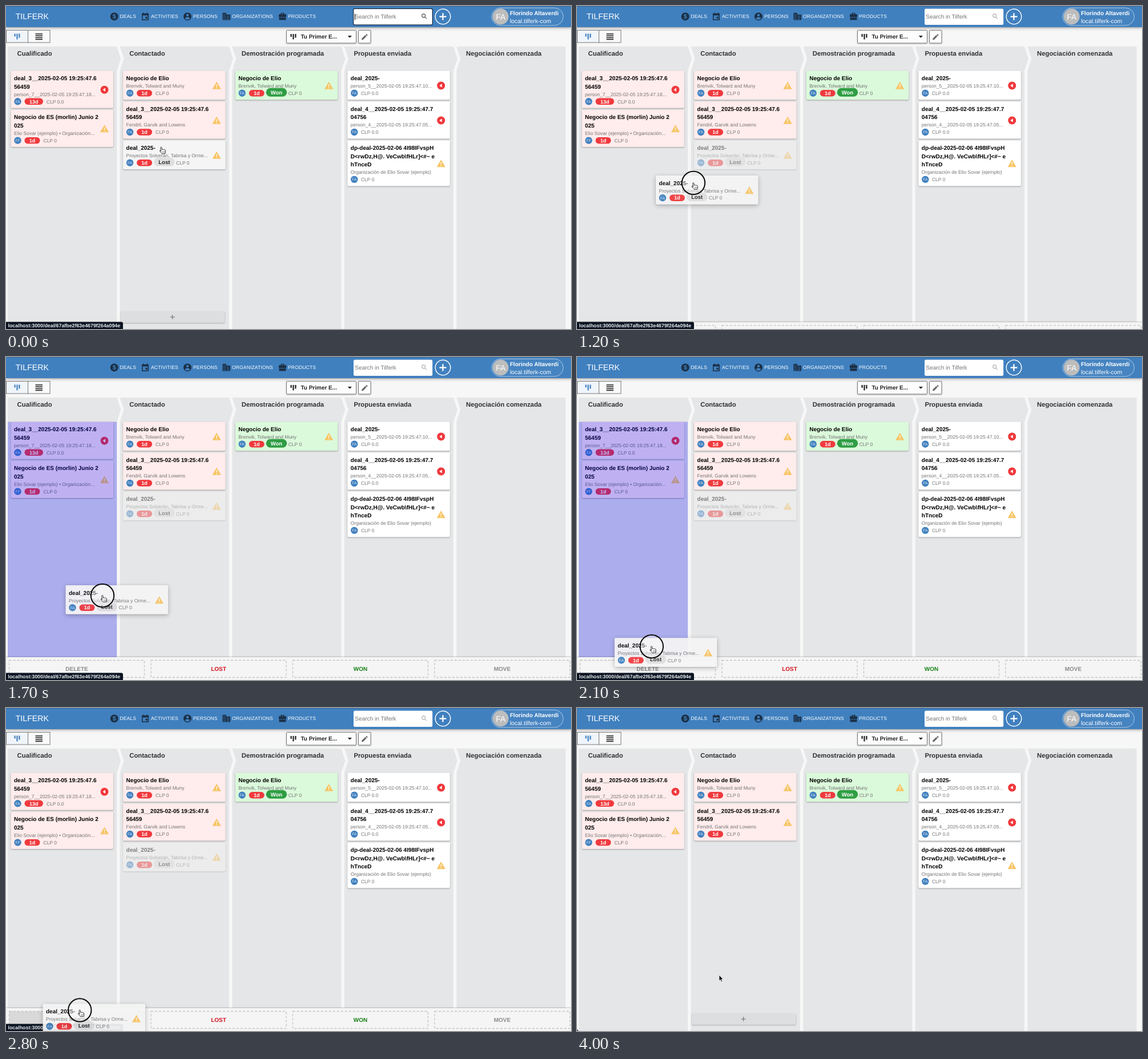
Recreate the animation shown at these times as an HTML page. Size 990 by 566 pixels, loop 4.6 s.

```html
<!DOCTYPE html>
<html lang="es">
<head>
<meta charset="utf-8">
<title>Deals board</title>
<style>
html, body { margin: 0; width: 100%; height: 100%; overflow: hidden; background: #f7f7f7; }
svg { display: block; width: 100vw; height: 100vh; font-family: "Liberation Sans", Arial, sans-serif; text-rendering: geometricPrecision; }
.b { font-weight: bold; }
.m { text-anchor: middle; }
.nav text { font-size: 8.5px; letter-spacing: .16px; fill: #fff; }
.head { font-size: 11.35px; font-weight: bold; fill: #303133; }
.title { font-size: 10px; font-weight: bold; fill: #000; }
.sub { font-size: 8.5px; fill: #737373; }
.tag { font-weight: bold; text-anchor: middle; }
.face { filter: drop-shadow(0 1px 1px rgba(0,0,0,.32)); }
.lift .face { filter: drop-shadow(0 1px 1px rgba(0,0,0,.12)) drop-shadow(0 2px 4px rgba(0,0,0,.25)); }
.soft { filter: drop-shadow(0 1px 1px rgba(0,0,0,.25)); }
.top { filter: drop-shadow(0 1px 1px rgba(0,0,0,.2)) drop-shadow(0 2px 2.5px rgba(0,0,0,.22)); }
</style>
</head>
<body>
<svg id="stage" viewBox="0 0 990 566" preserveAspectRatio="none">
  <rect width="990" height="566" fill="#f7f7f7"/>
  <g id="columns"></g>
  <g id="add">
    <rect class="soft" x="201" y="535" width="182.5" height="20" rx="2" fill="#dddee0"/>
    <path d="M287.7 545h8M291.7 541v8" stroke="#666" fill="none"/>
  </g>
  <g id="cards"></g>
  <rect id="over" x="3" y="113.5" width="191.2" height="452.5" fill="rgba(0,0,255,.25)"/>

  <rect class="top" width="990" height="37" fill="#4080bf"/>
  <rect width="990" height="1" fill="#35699c"/>
  <text x="16.7" y="23" font-size="14.2" fill="#fff">TILFERK</text>
  <g class="nav" fill="#1b2f45">
    <circle cx="189.7" cy="18.4" r="7"/>
    <text class="b m" x="189.7" y="22.2" style="font-size:11px;fill:#4080bf;letter-spacing:0">$</text>
    <path fill-rule="evenodd" d="M238 13h2v-1.6h1.5V13h5v-1.6h1.5V13h2v12h-12zM239.5 16.5v7h9v-7zM244.5 18.8h3.2v3.2h-3.2z"/>
    <circle cx="318" cy="18.4" r="7"/>
    <g fill="#4080bf"><circle cx="318" cy="16" r="2.2"/><path d="M313.7 22q0-2.6 4.3-2.6t4.3 2.6q-1.7 2-4.3 2t-4.3-2z"/></g>
    <path d="M379.5 12h6.5v12.5h-6.5zM386 15h7v9.5h-7z"/>
    <path d="M381 14.5h4M381 17.3h4M381 20h4M381 22.7h4M387 17.6h4.7M387 20.3h4.7M387 22.9h4.7" stroke="#4080bf" stroke-width="1.2" stroke-dasharray="1.4 1"/>
    <path fill-rule="evenodd" d="M478 14.5h3.5V12h6v2.5h3.5v5h-13zM483 13.3v1.2h3v-1.2zM478.5 20.3h12v4.2h-12z"/>
    <text x="199.4" y="21.4">DEALS</text>
    <text x="254" y="21.4">ACTIVITIES</text>
    <text x="328" y="21.4">PERSONS</text>
    <text x="396" y="21.4">ORGANIZATIONS</text>
    <text x="494" y="21.4">PRODUCTS</text>
  </g>
  <rect x="609" y="4.7" width="138.2" height="28.3" rx="2.5" fill="#fff"/>
  <g id="focus">
    <rect x="608.6" y="4.6" width="138.8" height="28.6" rx="2.5" fill="none" stroke="#10233a" stroke-width="1.2"/>
    <path d="M611.3 13.5v11" stroke="#111"/>
  </g>
  <text x="611.3" y="22.4" font-size="10.1" fill="#757575">Search in Tilferk</text>
  <g id="lens" fill="none" stroke-width="1.3"><circle cx="731.7" cy="17" r="3"/><path d="M733.9 19.2l3.2 3.2"/></g>
  <g fill="none" stroke="#fff"><circle cx="765.5" cy="18.6" r="13.3" stroke-width="1.4"/><path d="M759.5 18.6h12M765.5 12.6v12" stroke-width="2.3"/></g>
  <rect x="851" y="3.3" width="125.5" height="30.8" rx="15.4" fill="#4684c1" stroke="#c9dbec" stroke-width=".8"/>
  <circle cx="866.7" cy="18.6" r="14" fill="#bdbdbd"/>
  <text class="m" x="866.7" y="23.5" font-size="14" fill="#fff">FA</text>
  <text class="b" x="883" y="15.8" font-size="10" fill="#fff">Florindo Altaverdi</text>
  <text x="883" y="29.6" font-size="10.4" fill="#fff">local.tilferk-com</text>

  <g stroke="#767676">
    <rect x=".5" y="42.5" width="38" height="21.5" fill="#f0f5fb"/>
    <rect x="38.5" y="42.5" width="38.5" height="21.5" fill="#fafafa"/>
    <rect class="soft" x="491.5" y="42.5" width="122" height="22.5" rx="1" fill="#fdfdfd"/>
    <rect class="soft" x="617.5" y="42.5" width="21.5" height="22.5" rx="1" fill="#fdfdfd"/>
  </g>
  <path d="M14.5 48.5h2.2v5h-2.2zM18.4 48.5h2.2v10h-2.2zM22.3 48.5h2.2v7h-2.2z" fill="#4080bf"/>
  <path d="M51.5 49h12.5M51.5 52.2h12.5M51.5 55.4h12.5M51.5 58.6h12.5" stroke="#111" stroke-width="1.5"/>
  <path d="M498.5 49h2.2v5h-2.2zM502.4 49h2.2v9.5h-2.2zM506.3 49h2.2v6.5h-2.2z" fill="#222"/>
  <text class="b" x="516.4" y="57.4" font-size="10" fill="#222">Tu Primer E...</text>
  <path d="M598.8 52h7.2l-3.6 3.8z" fill="#222"/>
  <path d="M623.3 59.3v-2.2l6.2-6.2 2.2 2.2-6.2 6.2zM630.2 50.2l1-1q.5-.4 1 0l1.2 1.2q.4.5 0 1l-1 1z" fill="#666"/>

  <g id="bar"><rect y="526" width="990" height="42" fill="#f5f5f5" style="filter:drop-shadow(0 -1px 1px rgba(0,0,0,.2))"/></g>
  <path d="M0 561.5q.5 4 4 4.500h-4z" fill="#22324a"/>
  <g id="status">
    <path d="M0 553.5h202q3 0 3 3v9.500h-205z" fill="#0c1422"/>
    <text class="b" x="3.5" y="563" font-size="8.85" fill="#e6eaf0">localhost:3000/deal/67afbe2f63e4679f264a094e</text>
  </g>
  <g id="drag" class="lift" opacity=".93"></g>
  <g id="pointer">
    <circle id="ring" r="20.2" fill="rgba(250,250,250,.4)" stroke="#0a0a0a" stroke-width="2"/>
    <g id="hand" transform="rotate(-6)" stroke="#222" stroke-width=".9" stroke-linejoin="round">
      <path fill="#fff" d="M-1.3 7.2V.8a1.1 1.1 0 0 1 2.2 0V4.5c.4-.9 1.9-.8 2.1.2c.5-.7 1.8-.5 2 .5c.6-.5 1.7-.2 1.7.9V8.6c0 1-.8 1.8-.8 3H.2c-.3-1.3-2.2-2.9-3.4-4.9c-.7-1.2.6-2 1.3-1.2z"/>
      <path d="M1.7 7.5v2.3M3.3 7.5v2.3M4.9 7.5v2.3" stroke-width=".6"/>
    </g>
    <path id="arrow" d="M0 0V10.2L2.3 8.1L3.9 11.8L5.6 11L4 7.4H7.1Z" fill="#111" stroke="#fff" stroke-width=".7"/>
  </g>
</svg>
<script>
const $ = id => document.getElementById(id);
const LOOP = 4600, STEP = 100, PITCH = 196.6;

function el(parent, tag, attrs, text) {
  const n = document.createElementNS('http://www.w3.org/2000/svg', tag);
  for (const k in attrs) n.setAttribute(k, attrs[k]);
  if (text) n.textContent = text;
  parent.appendChild(n);
  return n;
}

const heads = ['Cualificado', 'Contactado', 'Demostración programada', 'Propuesta enviada', 'Negociación comenzada'];
heads.forEach((name, i) => {
  const x = 3 + PITCH * i;
  const right = i < 4 ? 'l7 21.2l-7 21.3' : 'v42.5';
  const left = i ? 'l7 -21.3z' : 'z';
  el($('columns'), 'path', { d: `M${x} 71h191.2${right}V566H${x}V113.5${left}`, fill: '#e5e6e7' });
  el($('columns'), 'text', { x: x + 16.6, y: 87.3, class: 'head' }, name);
});

function pill(g, x, y, w, h, fill, label, ink, size) {
  el(g, 'rect', { x, y: y - h / 2, width: w, height: h, rx: h / 2, fill });
  el(g, 'text', { x: x + w / 2, y: y + size * .36, class: 'tag', 'font-size': size, fill: ink }, label);
}

// A card drawn from its own top left corner; returns the height it takes.
function card(g, c) {
  const extra = (c.title.length - 1) * 14.6, h = 50.7 + extra, mid = h / 2 + .6, row = 39.2 + extra;
  el(g, 'rect', { width: 179.6, height: h, rx: 2, fill: c.fill || '#fff', class: 'face' });
  c.title.forEach((t, i) => el(g, 'text', { x: 5.5, y: 16.5 + i * 14.6, class: 'title' }, t));
  el(g, 'text', { x: 5.5, y: 29.6 + extra, class: 'sub' }, c.sub);
  el(g, 'circle', { cx: 12, cy: row, r: 6.2, fill: '#4080bf' });
  el(g, 'text', { x: 12, y: row + 2.4, class: 'm', 'font-size': 6.6, fill: '#dfeaf5' }, c.who || 'FA');
  let x = 23.6;
  if (c.days) {
    const w = c.days.length > 2 ? 32.5 : 27;
    pill(g, 24, row, w, 11.4, '#f03a3e', c.days, '#fff', 9);
    x = 30 + w;
  }
  if (c.state) {
    const won = c.state === 'Won';
    pill(g, 54, row - 1.4, 36.5, 15, won ? '#2f9e44' : '#dfdfdf', c.state, won ? '#fff' : '#222', 9.5);
    x = 93;
  }
  el(g, 'text', { x, y: row + 3.2, class: 'sub' }, c.value || 'CLP 0');
  if (c.late) {
    el(g, 'circle', { cx: 164, cy: mid, r: 7, fill: '#f0383c' });
    el(g, 'path', { d: `M161 ${mid}l4.5 -3.3v6.6z`, fill: '#fff' });
  } else {
    el(g, 'path', { d: `M164 ${mid - 6.7}l7.6 13h-15.2z`, fill: '#f7c566' });
    el(g, 'path', { d: `M164 ${mid - 2.2}v4M164 ${mid + 3}v1.5`, stroke: '#fff', 'stroke-width': 1.3 });
  }
  return h;
}

const PINK = '#ffecec';
const lost = { title: ['deal_2025-'], sub: 'Proyectos Solverán, Tabrisa y Orme...', days: '1d', state: 'Lost', fill: '#f5f5f5' };
const stamped = ['deal_3__2025-02-05 19:25:47.6', '56459'];
const elio = { title: ['Negocio de Elio'], sub: 'Brenvik, Tolward and Muny', days: '1d' };
const board = [
  [
    { title: stamped, sub: 'person_7__2025-02-05 19:25:47.18...', days: '13d', value: 'CLP 0.0', late: 1, fill: PINK },
    { title: ['Negocio de ES (morlin) Junio 2', '025'], sub: 'Elio Sovar (ejemplo) • Organización...', days: '1d', who: 'FF', fill: PINK }
  ],
  [
    { ...elio, fill: PINK },
    { title: stamped, sub: 'Fendril, Garvik and Lowens', days: '1d', fill: PINK },
    lost
  ],
  [{ ...elio, state: 'Won', fill: '#dbf9db' }],
  [
    { title: ['deal_2025-'], sub: 'person_5__2025-02-05 19:25:47.10...', value: 'CLP 0.0', late: 1 },
    { title: ['deal_4__2025-02-05 19:25:47.7', '04756'], sub: 'person_4__2025-02-05 19:25:47.05...', value: 'CLP 0.0', late: 1 },
    { title: ['dp-deal-2025-02-06 4I98IFvspH', 'D<rwDz,H@. VeCwb\\fHLr]<#~ e', 'hTnceD'], sub: 'Organización de Elio Sovar (ejemplo)' }
  ]
];
let ghost;
board.forEach((list, i) => {
  let y = 113.5;
  for (const c of list) {
    const g = el($('cards'), 'g', { transform: `translate(${8.5 + PITCH * i} ${y})` });
    y += card(g, c) + 3;
    if (c === lost) ghost = g;
  }
});
card($('drag'), lost);

let drop;
[['DELETE', '#8a8a8a'], ['LOST', '#d3121c'], ['WON', '#158015'], ['MOVE', '#8a8a8a']].forEach(([name, ink], i) => {
  const box = { x: 5.5 + 248.5 * i, y: 531.5, width: 237, height: 30 };
  if (!i) drop = el($('bar'), 'rect', { ...box, fill: '#d0d1d2' });
  el($('bar'), 'rect', { ...box, fill: 'none', stroke: '#c4c4c4', 'stroke-width': 1.3, 'stroke-dasharray': '4.2 2.8' });
  el($('bar'), 'text', { x: box.x + 118.5, y: 550, class: 'b m', 'font-size': 10, fill: ink }, name);
});

// time, pointer x and y, dragged card x and y
const path = [
  [1000, 272, 247.5, 205.1, 236], [1100, 261, 257, 194, 245], [1200, 204, 310, 138, 297],
  [1300, 155.5, 355.5, 89, 345.3], [1400, 155, 358, 89, 348], [1700, 169, 418, 104.5, 400],
  [2000, 131, 503, 66, 487], [2500, 130, 524, 65, 513], [3100, 128.5, 535, 64, 524],
  [3400, 128.5, 535, 64, 524], [3900, 240, 475, 64, 524], [4000, 249, 468, 64, 524]
];
function at(t) {
  const i = path.findIndex(k => k[0] > t);
  if (i === 0) return path[0];
  if (i < 0) return path[path.length - 1];
  const a = path[i - 1], b = path[i], p = (t - a[0]) / (b[0] - a[0]);
  return a.map((v, j) => v + (b[j] - v) * p);
}

const clamp = v => Math.min(1, Math.max(0, v));
// CSS "ease": cubic-bezier(.25, .1, .25, 1)
function ease(p) {
  let lo = 0, hi = 1;
  for (let i = 0; i < 24; i++) {
    const u = (lo + hi) / 2;
    if (.75 * u * (1 - u) + u ** 3 < p) lo = u; else hi = u;
  }
  return .3 * lo * (1 - lo) ** 2 + 3 * lo * lo * (1 - lo) + lo ** 3;
}

const show = (n, on) => { n.style.display = on ? '' : 'none'; };
const move = (n, x, y) => n.setAttribute('transform', `translate(${x} ${y})`);

function draw(t) {
  const [, x, y, cx, cy] = at(t);
  const dragging = t >= 1100 && t < 3400;
  move($('pointer'), x, y);
  move($('drag'), cx, cy);
  show($('drag'), dragging);
  show($('ring'), t >= 900 && t < 3400);
  show($('hand'), t < 3500);
  show($('arrow'), t >= 3500);
  show($('focus'), t < 1100);
  $('lens').setAttribute('stroke', t < 1100 ? '#666' : '#bbb');
  show($('add'), t < 1100 || t >= 3800);
  show($('over'), t >= 1300 && t < 2600);
  show($('status'), t < 4000);
  ghost.setAttribute('opacity', t < 1100 ? 1 : .45);
  show(ghost, t < 3700);
  drop.setAttribute('opacity', t < 3500 ? clamp((t - 2500) / 400) : 0);
  const up = ease(clamp((t - 1100) / 500)) - ease(clamp((t - 3400) / 500));
  show($('bar'), up > .001);
  move($('bar'), 0, 40 * (1 - up));
}

const start = performance.now();
function tick() {
  const t = (performance.now() - start) % LOOP;
  draw(Math.floor(t / STEP) * STEP);
  requestAnimationFrame(tick);
}
tick();
</script>
</body>
</html>
```
